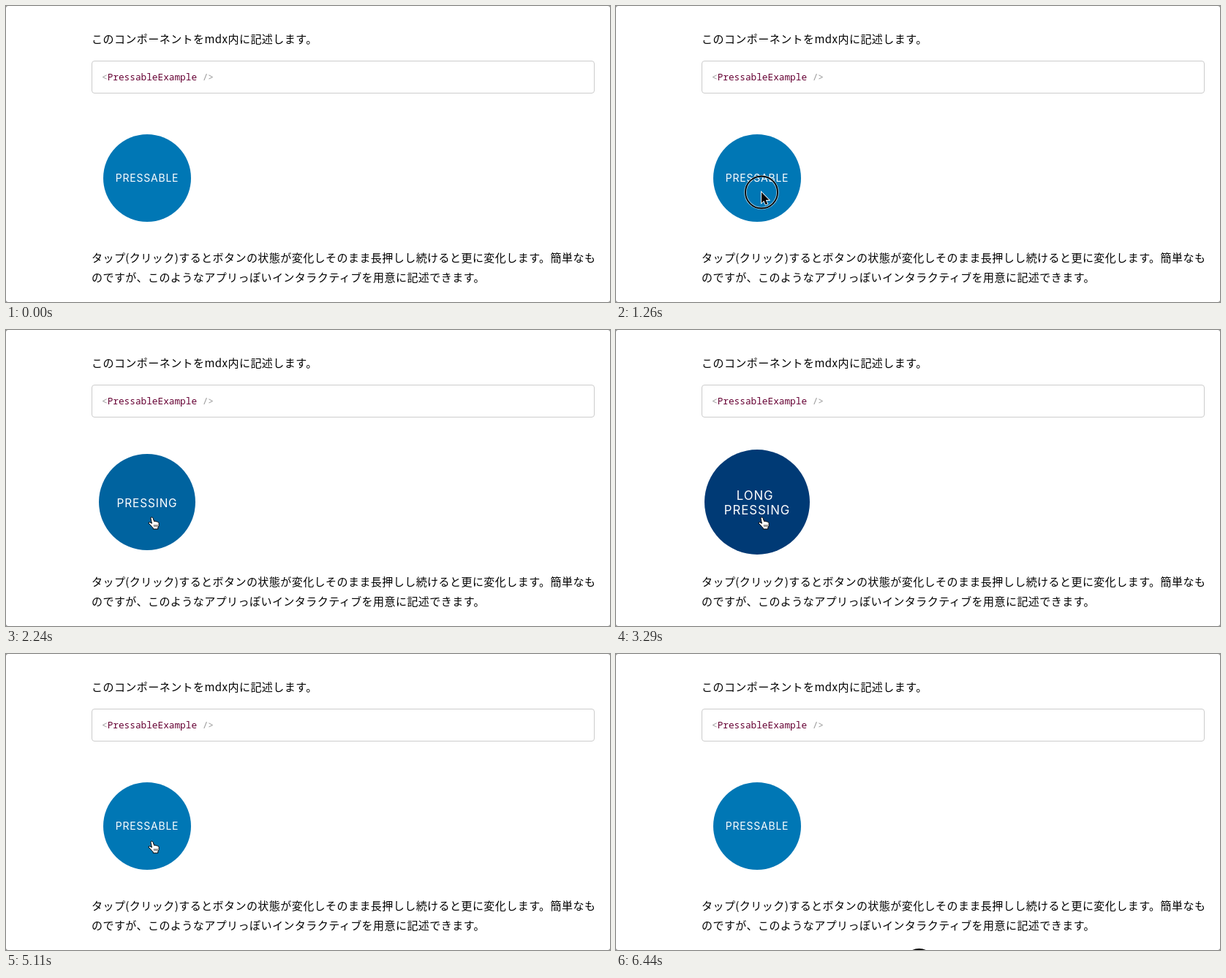
Animation of 826x406 px, one loop 6510 ms. Source, as an HTML page:

```html
<!DOCTYPE html>
<html lang="ja">
<head>
<meta charset="utf-8">
<title>Pressable</title>
<style>
  html, body { margin: 0; height: 100%; overflow: hidden; background: #fff; }
  svg { display: block; width: 100vw; height: 100vh; }
  .body { font: 15px "Noto Sans CJK JP", "Noto Sans CJK", sans-serif; letter-spacing: .45px; }
  .code { font: 12.75px "Noto Sans Mono", monospace; fill: #603; white-space: pre; }
  .mark { fill: #999; }
  .label { font: 14px Inter, sans-serif; letter-spacing: .8px; fill: #fff; text-anchor: middle; }
  #ring circle { fill: none; }
</style>
</head>
<body>
<svg viewBox="0 0 826 406">
  <rect width="826" height="406" fill="#888"/>
  <rect width="826" height="406" rx="3" fill="#fff"/>
  <text class="body" x="117" y="51">このコンポーネントをmdx内に記述します。</text>
  <rect x="117.5" y="75.5" width="687" height="44" rx="3.5" fill="#fff" stroke="#ccc"/>
  <text class="code" x="131" y="102"><tspan class="mark">&lt;</tspan>PressableExample <tspan class="mark">/&gt;</tspan></text>
  <text class="body" x="117" y="351">タップ(クリック)するとボタンの状態が変化しそのまま長押しし続けると更に変化します。簡単なも</text>
  <text class="body" x="117" y="378">のですが、このようなアプリっぽいインタラクティブを用意に記述できます。</text>

  <g id="button">
    <circle r="60"/>
    <g class="label"><text y="5.1">PRESSABLE</text></g>
    <g class="label"><text y="6">PRESSING</text></g>
    <g class="label"><text x="-2.4" y="-2.5">LONG</text><text y="14.5">PRESSING</text></g>
  </g>

  <g id="cursor">
    <g id="ring">
      <circle r="22" stroke="#fff" stroke-opacity=".6" stroke-width="3.6"/>
      <circle r="22" stroke="#000" stroke-width="1.8"/>
    </g>
    <path id="arrow" d="M0 0V14.5L3.3 11.4 5.6 16.9 8.2 15.8 5.8 10.5H10.2Z" stroke="#fff" stroke-width="1.8" paint-order="stroke"/>
    <g id="hand" fill="#fff" stroke="#000" stroke-linejoin="round">
      <path d="M-1 3Q-1.2 1.4 .2 1.3T2.2 2.8L3.6 7Q5.3 6 6.2 7.4 7.6 6.7 8.3 8 9.8 7.6 10.2 9.4L10 13.2 8.8 15.4V17.5H2.2V16Q.2 14.2-1.2 12.2L-4 9.8Q-4.2 7.8-2.4 8.2L.4 9.8Z"/>
      <path d="M3.8 11.5V14.5M5.8 11.5V14.5M7.8 11.5V14.5" stroke-width=".8"/>
    </g>
  </g>
</svg>
<script>
const LOOP = 6510, STEP = 70;
const CENTER = { x: 193, y: 236 };
const STATES = [
  { scale: 1, color: '#0077b5' },
  { scale: 1.1, color: '#00639f' },
  { scale: 1.2, color: '#003a75' },
];
const easeOut = p => p * (2 - p);
const easeInOut = p => p * p * (3 - 2 * p);
const MOVES = [
  { start: 70, end: 280, from: [766, 358], to: [292, 342], ease: easeOut },
  { start: 420, end: 910, from: [292, 342], to: [199, 255.5], ease: easeInOut },
  { start: 5320, end: 5880, from: [199, 255.5], to: [354, 410], ease: easeInOut },
  { start: 6440, end: 6510, from: [414.5, 427], to: [414.5, 427], ease: easeOut },
];

const $ = id => document.getElementById(id);
const labels = document.querySelectorAll('.label');
const show = (el, on) => el.setAttribute('visibility', on ? 'visible' : 'hidden');
const within = (t, start, end) => t >= start && t < end;

function cursorAt(t) {
  const move = MOVES.findLast(m => t >= m.start);
  if (!move) return [-50, -50];
  const p = move.ease(Math.min(1, (t - move.start) / (move.end - move.start)));
  return move.from.map((v, i) => v + (move.to[i] - v) * p);
}

function draw(t) {
  const state = within(t, 2240, 3290) ? 1 : within(t, 3290, 5110) ? 2 : 0;
  const { scale, color } = STATES[state];
  $('button').setAttribute('transform', `translate(${CENTER.x} ${CENTER.y}) scale(${scale})`);
  $('button').firstElementChild.setAttribute('fill', color);
  labels.forEach((label, i) => show(label, i === state));

  const [x, y] = cursorAt(t);
  const visible = within(t, 70, 5880) || t >= 6440;
  const hovering = t >= 1890 && Math.hypot(x - CENTER.x, y - CENTER.y) < 60 * scale;
  $('cursor').setAttribute('transform', `translate(${x} ${y})`);
  show($('arrow'), visible && !hovering);
  show($('hand'), visible && hovering);
  show($('ring'), within(t, 1260, 1820) || t >= 6440);
}

function tick() {
  draw(Math.floor(performance.now() % LOOP / STEP) * STEP);
  requestAnimationFrame(tick);
}
tick();
</script>
</body>
</html>
```
